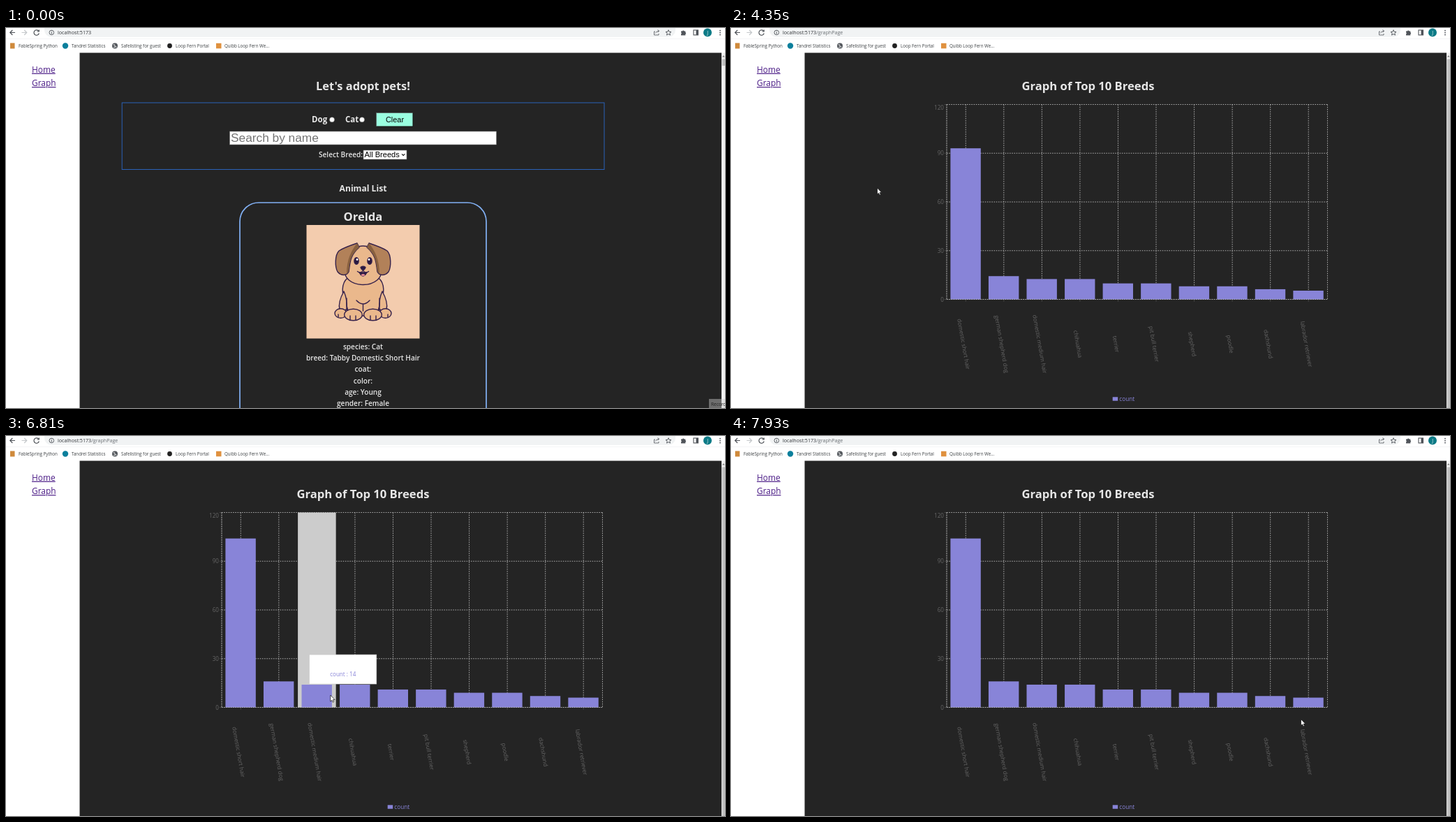
These frames come from a looping animation (1030x544 px, 8 s). An HTML page:

```html
<!DOCTYPE html>
<html lang="en">
<head>
<meta charset="utf-8">
<title>Adopt pets</title>
<style>
  html, body { margin: 0; width: 100%; height: 100%; overflow: hidden; background: #fff; }
  svg { display: block; width: 100vw; height: 100vh; font-family: "Open Sans", "Noto Sans", sans-serif; }
  .mid { text-anchor: middle; }
  .bold { font-weight: 700; fill: #e6e6e6; }
  .semi { font-weight: 600; fill: #e6e6e6; font-size: 10.1px; }
  .arial { font-family: "Liberation Sans", Arial, sans-serif; }
  .marks { font-size: 6.2px; fill: #3c4043; }
  .link { font-size: 11.9px; fill: #4b1c86; text-decoration: underline; }
  .icon { fill: none; stroke: #50545a; stroke-width: 1.2; }
  .grid { stroke: #ccc; stroke-width: .8; stroke-dasharray: 1.608 1.608; fill: none; }
  .tick { font-size: 8.1px; fill: #666; }
  .axis { stroke: #666; stroke-width: .55; fill: none; }
  .ink { stroke: #35214b; stroke-width: 1.4; stroke-linejoin: round; stroke-linecap: round; }
</style>
</head>
<body>
<svg viewBox="0 0 1030 544" preserveAspectRatio="none">
  <rect width="1030" height="544" fill="#fff"/>

  <!-- browser bar -->
  <rect x="55" y="-8" width="904" height="21" rx="10" fill="#f1f3f4"/>
  <path d="M0 15.5H1030" stroke="#eceef0" stroke-width=".6"/>
  <g class="icon">
    <path d="M13 6.5H6M9.3 3L5.8 6.5L9.3 10"/>
    <path d="M22.5 6.5H29.5M26.2 3L29.7 6.5L26.2 10" stroke="#c4c7ca"/>
    <path d="M46.5 4.2A3.7 3.7 0 1 0 47.3 7.5M47.3 2.5V5H44.7"/>
    <circle cx="65.3" cy="6.5" r="3.3" stroke-width=".9"/>
    <path d="M65.3 6V8.5M65.3 4.4V5.2" stroke-width="1"/>
    <path d="M930 5H928.5V10H935V8M930.5 7.5Q931 4.5 935.5 4.3M933.5 2.5L935.7 4.3L933.5 6.2" stroke-width=".8"/>
    <path d="M949 2.7L950.1 5.4L953 5.6L950.8 7.4L951.5 10.2L949 8.7L946.5 10.2L947.2 7.4L945 5.6L947.9 5.4Z" stroke-width=".9"/>
    <rect x="985" y="3" width="6.5" height="7" stroke-width="1.1"/>
  </g>
  <path d="M967 4.5H969A1.3 1.3 0 0 1 971.5 4.5H973.3V6.3A1.3 1.3 0 0 1 973.3 8.7V10.5H967V8.5A1.2 1.2 0 0 0 967 6.3Z" fill="#50545a"/>
  <rect x="988.5" y="3" width="3" height="7" fill="#50545a"/>
  <circle cx="1005" cy="6.5" r="6" fill="#0b7a86"/>
  <text class="mid" x="1005" y="9" font-size="6.5" fill="#fff">J</text>
  <g fill="#50545a"><circle cx="1023" cy="3.7" r=".9"/><circle cx="1023" cy="6.7" r=".9"/><circle cx="1023" cy="9.7" r=".9"/></g>
  <text x="74" y="9.2" font-size="7.15" fill="#33363a">localhost:5173<tspan id="path" fill="#6b7075">/graphPage</tspan></text>

  <!-- bookmarks -->
  <rect x="6" y="21.5" width="6.5" height="8" fill="#cf8a3c"/>
  <circle cx="85" cy="25.5" r="4.2" fill="#0b7f9c"/>
  <circle cx="156" cy="25.5" r="4" fill="#54585d"/>
  <path d="M153.5 24Q156 23 156 25.5T158.5 27M154 28L156 27" stroke="#fff" stroke-width=".9" fill="none"/>
  <circle cx="234.5" cy="25.5" r="3.4" fill="#222"/>
  <rect x="301" y="21.8" width="7.5" height="7.5" fill="#e0913f"/>
  <g class="marks">
    <text x="18" y="27.8">FableSpring Python</text>
    <text x="94" y="27.8">Tandrel Statistics</text>
    <text x="165" y="27.8">Safelisting for guest</text>
    <text x="243" y="27.8">Loop Fern Portal</text>
    <text x="313" y="27.8">Quibb Loop Fern We...</text>
  </g>

  <!-- page frame -->
  <rect x="105.5" y="35.5" width="919.5" height="508.5" fill="#242424"/>
  <rect x="1025" y="35.5" width="5" height="508.5" fill="#f1f1f1"/>
  <path d="M1026 41.5L1027.8 39.3L1029.6 41.5Z" fill="#777"/>
  <rect id="thumb" x="1025.7" y="44.5" width="4.3" fill="#c1c1c1"/>
  <text class="link" x="37" y="63.7">Home</text>
  <text class="link" id="graphLink" x="37" y="83.2">Graph</text>

  <g id="home">
    <text class="bold mid" x="511.5" y="88.5" font-size="16.4">Let's adopt pets!</text>
    <rect x="166.2" y="107" width="690.8" height="95.5" fill="none" stroke="#2b62b8"/>
    <g class="bold" font-size="11.5"><text x="438" y="135.2">Dog</text><text x="486" y="135.2">Cat</text></g>
    <g fill="#fff" stroke="#767676" stroke-width=".5"><circle cx="467" cy="131.2" r="3.5"/><circle cx="510" cy="131.2" r="3.5"/></g>
    <rect x="530.5" y="121.5" width="52.5" height="19.5" fill="#9affe0"/>
    <path d="M530.5 141V121.5H583" fill="none" stroke="#5b6f69"/>
    <path d="M530.5 141H583V121.5" fill="none" stroke="#111"/>
    <text class="mid arial" x="557" y="135.1" font-size="10.9">Clear</text>
    <rect x="320.5" y="148" width="382" height="19" fill="#fff" stroke="#777" stroke-width=".6"/>
    <text class="arial" x="322" y="163.2" font-size="17.3" fill="#757575">Search by name</text>
    <text class="semi" x="448" y="185.2">Select Breed:</text>
    <rect x="512" y="175" width="62" height="13" fill="#fff" stroke="#777" stroke-width=".6"/>
    <text class="arial" x="513.5" y="185.3" font-size="11">All Breeds</text>
    <path d="M567 180.3L569.2 182.5L571.4 180.3" fill="none" stroke="#111" stroke-width="1.1"/>
    <text class="bold mid" x="511.5" y="234" font-size="12.1">Animal List</text>
    <path d="M335 544V277A27 27 0 0 1 362 250H661A27 27 0 0 1 688 277V544" fill="none" stroke="#82b1f5" stroke-width="1.7"/>
    <text class="bold mid" x="511.5" y="276.2" font-size="16.6">Orelda</text>
    <rect x="430.5" y="282" width="162" height="162.5" fill="#f3ccae"/>
    <g class="ink" fill="#eab88c">
      <path d="M489 358C480 366 481 380 486 392L490 412H533L537 392C542 380 543 366 534 358Z"/>
      <g id="half">
        <path d="M484 377C479 386 476 396 478 403Q484 408 488 402Q489 388 484 377Z"/>
        <ellipse cx="479.5" cy="408.5" rx="8.5" ry="6.8"/>
        <path d="M488 387Q487 398 490 404" fill="none"/>
        <ellipse cx="497.5" cy="410.5" rx="12.8" ry="8.3"/>
        <path d="M493 412V418M501 412V418M476 410V414" fill="none"/>
      </g>
      <use href="#half" transform="translate(1023) scale(-1 1)"/>
      <path d="M502 390Q511.5 400 521 390M511.5 395V405" fill="none"/>
      <path d="M511.5 312C497 312 490 322 486 341C481 359 497 367.500 511.500 367.500S542 359 537 341C533 322 526 312 511.500 312Z"/>
      <g id="ear">
        <path d="M503 308C494 311 483 315 477 319C471 325 471 342 475 349C480 355 488 355 491 349C493 337 492 326 506 314Z" fill="#b28159"/>
        <path d="M503 308C495 318 488 331 488 352Q491 350 491.500 345C493 332 494 325 506 314Z" fill="#88603f" stroke="none"/>
        <ellipse cx="502" cy="333.5" rx="3.1" ry="4.8" fill="#2a193f"/>
        <circle cx="503" cy="331.5" r="1.4" fill="#fff" stroke="none"/>
      </g>
      <use href="#ear" transform="translate(1023) scale(-1 1)"/>
      <path d="M506 350Q511.5 360 517 350Z" fill="#2a193f"/>
      <ellipse cx="511.5" cy="353.5" rx="2.7" ry="1.5" fill="#e58c96" stroke="none"/>
      <path d="M508 342.5Q511.5 340 515 342.5Q514 346 511.5 346.5Q509 346 508 342.5Z" fill="#2a193f"/>
      <path d="M503.5 348.5Q508.5 352 511.5 347Q514.5 352 519.5 348.5" fill="none"/>
    </g>
    <g class="semi mid" id="facts"></g>
  </g>

  <g id="graph">
    <text class="bold mid" x="511.5" y="88.5" font-size="16.65">Graph of Top 10 Breeds</text>
    <g id="chart">
      <g id="lines"></g>
      <rect id="hover" y="109.5" width="54.55" height="279" fill="#ccc"/>
      <g id="bars" fill="#8884d8"></g>
    </g>
    <path class="grid" d="M309 109.5H854.5M309 388.5H854.5M309 109.5V388.5M854.5 109.5V388.5"/>
    <rect x="546.7" y="528.3" width="7.5" height="5.4" fill="#8884d8"/>
    <text x="556.3" y="533.5" font-size="8.25" fill="#8884d8">count</text>
    <g id="tip">
      <rect height="42" fill="#fff" stroke="#ccc" stroke-width=".6"/>
      <text class="mid" y="14.5" font-size="8.1" fill="#fff"></text>
      <text class="mid" y="30.8" font-size="8.1" fill="#8884d8"></text>
    </g>
  </g>

  <g id="record">
    <rect x="1007" y="531" width="23" height="13" fill="#c8c8c8" opacity=".45"/>
    <text x="1010" y="541" font-size="6.5" fill="#222">Record</text>
  </g>

  <g id="cursor" stroke="#111" stroke-width=".7" fill="#fff" stroke-linejoin="round">
    <path id="arrow" d="M0 0V9L2 7.2L3.4 10.2L4.9 9.5L3.6 6.6H6.3Z"/>
    <path id="hand" d="M-1 .8Q0 -.7 1 .8V4Q4 3.8 6 5.3V8.5L5 11H0L-3.3 7Q-3.3 5.5 -1 6.8Z"/>
  </g>
</svg>
<script>
const LOOP = 8000, LEFT = 309, TOP = 109.5, BASE = 388.5, STEP = 54.55, UNIT = 279 / 120;
const CLICK = 1150, SWITCH = 1280, LOADED = 4140, GROW = 400, HOVER = 5130;

const breeds = [
  ["domestic short hair", 104], ["german shepherd dog", 16], ["domestic medium hair", 14],
  ["chihuahua", 14], ["terrier", 11], ["pit bull terrier", 11], ["shepherd", 9],
  ["poodle", 9], ["dachshund", 7], ["labrador retriever", 6]
];
const facts = ["species: Cat", "breed: Tabby Domestic Short Hair", "coat:", "color:", "age: Young", "gender: Female"];

// each stop: time, x, y
const pointer = [
  [266, 996, 529], [400, 800, 420], [560, 480, 270], [740, 230, 150], [900, 110, 98], [1020, 66, 81],
  [1550, 53, 79], [1800, 53, 79], [2000, 75, 100], [2300, 150, 175], [2610, 202, 223.5], [2750, 206, 227.5],
  [4140, 206, 227.5], [4500, 212, 230], [4940, 231, 238], [5010, 270, 250], [5080, 318, 260],
  [5250, 400, 266], [5330, 413, 268], [5500, 375, 266], [5670, 340.5, 264], [5900, 345, 270],
  [6050, 360, 290], [6300, 385, 330], [6670, 408, 366], [6740, 438, 370], [6810, 464.5, 371],
  [7270, 597.5, 373], [7540, 652, 376], [7600, 672, 380], [7900, 812, 387], [7930, 816.5, 405.5]
];
const tipPath = [
  [5130, 345, 266], [5250, 372, 268], [5400, 424, 274], [5670, 342, 265], [5900, 350, 274],
  [6300, 370, 300], [6670, 405, 310], [6810, 434.5, 313], [7270, 505.3, 325.3], [7540, 581, 330], [7930, 715, 334]
];

const $ = id => document.getElementById(id);
const show = (id, on) => $(id).setAttribute("visibility", on ? "inherit" : "hidden");
const move = (node, x, y) => node.setAttribute("transform", `translate(${x} ${y})`);

function along(stops, t) {
  const i = stops.findIndex(s => s[0] > t);
  if (i === 0) return stops[0].slice(1);
  if (i < 0) return stops[stops.length - 1].slice(1);
  const [t0, x0, y0] = stops[i - 1], [t1, x1, y1] = stops[i];
  const k = (t - t0) / (t1 - t0);
  return [x0 + (x1 - x0) * k, y0 + (y1 - y0) * k];
}

$("facts").innerHTML = facts.map((f, i) => `<text x="511.5" y="${460 + i * 16.2}">${f}</text>`).join("");

let lines = `<path class="axis" d="M${LEFT} ${TOP}V${BASE}H854.5"/>`;
for (let v = 0; v <= 120; v += 30) {
  const y = BASE - v * UNIT;
  if (v % 120) lines += `<path class="grid" d="M${LEFT} ${y}H854.5"/>`;
  lines += `<path class="axis" d="M${LEFT - 3.2} ${y}H${LEFT}"/>
    <text class="tick" text-anchor="end" x="305" y="${(v === 120 ? y + 4 : y) + 3}">${v}</text>`;
}
breeds.forEach(([name], i) => {
  const x = LEFT + (i + .5) * STEP;
  lines += `<path class="grid" d="M${x} ${TOP}V${BASE}"/><path class="axis" d="M${x} ${BASE}v3.2"/>
    <text class="tick mid" transform="translate(${x - 3.3} 452.5) rotate(80)" y="2.5">${name}</text>`;
});
$("lines").innerHTML = lines;
$("bars").innerHTML = breeds.map((b, i) => `<rect x="${LEFT + 5.4 + i * STEP}" width="43.4"/>`).join("");

const bars = [...$("bars").children];
const [tipBox, tipName, tipCount] = $("tip").children;

function drawTip(index, t) {
  const [name, count] = breeds[index];
  tipName.textContent = name;
  tipCount.textContent = `count : ${count}`;
  const width = Math.max(tipName.getComputedTextLength(), tipCount.getComputedTextLength()) + 11;
  tipBox.setAttribute("width", width);
  tipName.setAttribute("x", width / 2);
  tipCount.setAttribute("x", width / 2);
  move($("tip"), ...along(tipPath, t));
}

function draw(t) {
  const onGraph = t >= SWITCH, loaded = t >= LOADED;
  show("home", !onGraph);
  show("graph", onGraph);
  show("path", onGraph);
  show("chart", onGraph && loaded);
  show("record", t < 70);
  $("thumb").setAttribute("height", onGraph ? 499.5 : 9.5);
  $("graphLink").style.fill = t >= CLICK && t < SWITCH ? "#f00" : "";

  const [x, y] = along(pointer, t);
  const onLink = x > 36 && x < 71 && y > 71 && y < 87;
  const onScreen = t >= pointer[0][0];
  show("arrow", onScreen && !onLink);
  show("hand", onScreen && onLink);
  move($("cursor"), x, y);

  const grow = 1 - (1 - Math.min(1, Math.max(0, (t - LOADED) / GROW))) ** 3;
  bars.forEach((bar, i) => {
    const h = breeds[i][1] * UNIT * grow;
    bar.setAttribute("y", BASE - h);
    bar.setAttribute("height", h);
  });

  const index = Math.floor((x - LEFT) / STEP);
  const hovering = t >= HOVER && breeds[index] !== undefined && y > TOP && y < BASE;
  show("hover", hovering);
  show("tip", hovering);
  if (hovering) {
    $("hover").setAttribute("x", LEFT + index * STEP);
    drawTip(index, t);
  }
}

const start = performance.now();
function tick() {
  draw((performance.now() - start) % LOOP);
  requestAnimationFrame(tick);
}
tick();
</script>
</body>
</html>
```
